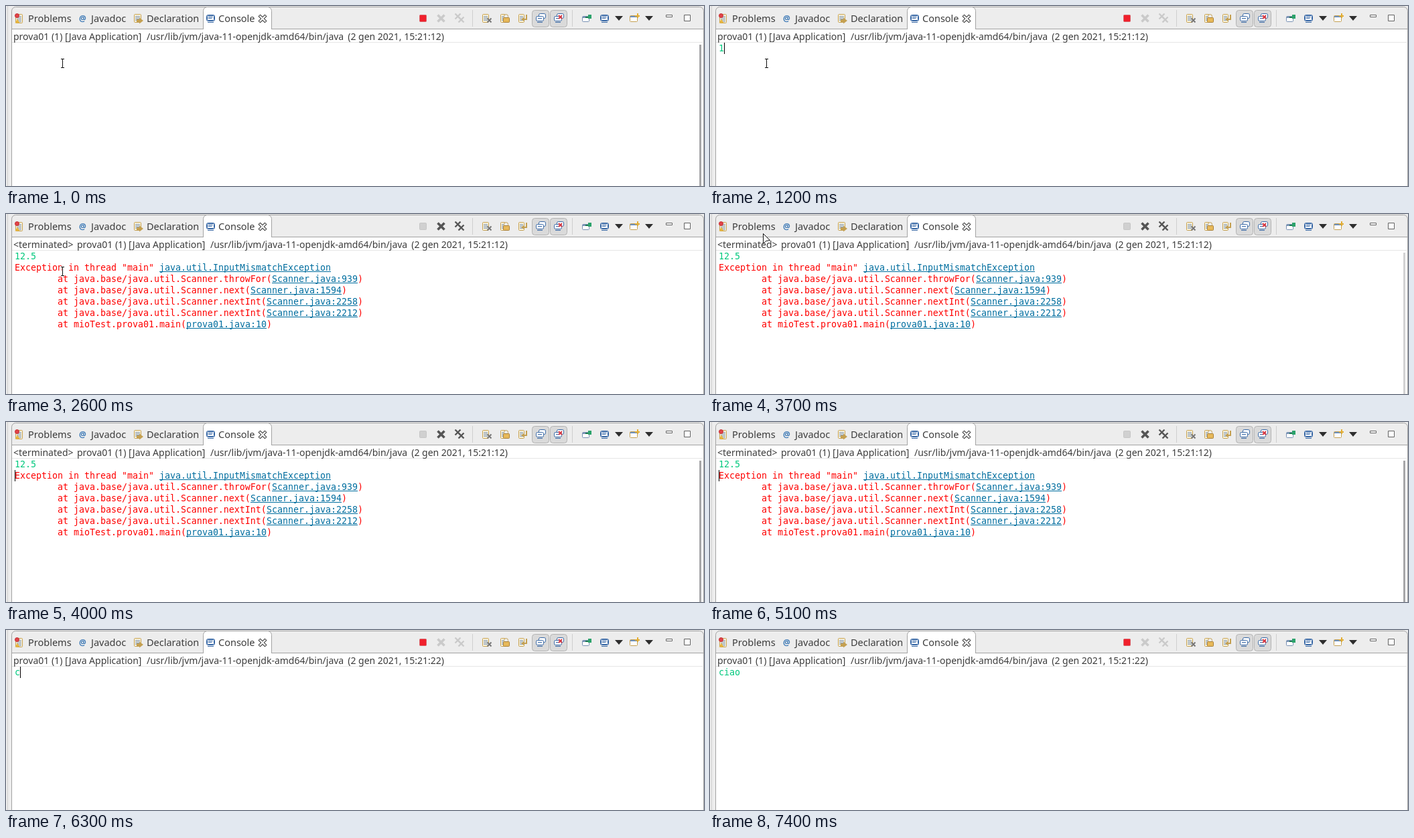
These frames come from a looping animation (1042 px wide and 270 px high, 8 s). An HTML page with a canvas:

```html
<!DOCTYPE html>
<html lang="it">
<head>
<meta charset="utf-8">
<title>Console</title>
<style>
html, body { margin: 0; width: 100%; height: 100%; overflow: hidden; background: #fff; }
canvas { display: block; }
</style>
</head>
<body>
<canvas id="stage" width="1042" height="270"></canvas>
<script>
const ctx = document.getElementById('stage').getContext('2d');
const LOOP = 8000, TICK = 100, BLINK = 600;
const END = 2600, FOCUS = 4000, RESTART = 5400, RERUN = 5600;
const UI = '"Noto Sans", "Open Sans", sans-serif';
const TITLE = '14px ' + UI, TAB = '14.5px ' + UI;
const MONO = '13.29px "DejaVu Sans Mono", monospace';
const INK = '#3c3c3c', EDGE = '#a3a3a3', BLUE = '#3465a4', GOLD = '#c4a052', CREAM = '#fff6dc';
const LEFT = 13, CHAR = 8, LINE = 17, BASE = 68;

const TRACE = [
  'Exception in thread "main" java.util.InputMismatchException',
  ...['java.base/java.util.Scanner.throwFor(Scanner.java:939)',
    'java.base/java.util.Scanner.next(Scanner.java:1594)',
    'java.base/java.util.Scanner.nextInt(Scanner.java:2258)',
    'java.base/java.util.Scanner.nextInt(Scanner.java:2212)',
    'mioTest.prova01.main(prova01.java:10)'].map(call => '        at ' + call)
];
const LINK = /java\.util\.\w+Exception|\w+\.java:\d+/;

const clamp = u => Math.min(1, Math.max(0, u));

function rect(x, y, w, h, color) {
  ctx.fillStyle = color;
  ctx.fillRect(x, y, w, h);
}

function box(x, y, w, h, radius, fill, stroke) {
  ctx.beginPath();
  ctx.roundRect(x + .5, y + .5, w - 1, h - 1, radius);
  ctx.fillStyle = fill;
  ctx.fill();
  ctx.strokeStyle = stroke;
  ctx.lineWidth = 1;
  ctx.stroke();
}

function text(str, x, y, font, color, align = 'left') {
  ctx.font = font;
  ctx.fillStyle = color;
  ctx.textAlign = align;
  ctx.fillText(str, x, y);
}

function cross(cx, cy, r, width, color) {
  ctx.beginPath();
  for (const s of [-1, 1]) {
    ctx.moveTo(cx - r, cy - r * s);
    ctx.lineTo(cx + r, cy + r * s);
  }
  ctx.strokeStyle = color;
  ctx.lineWidth = width;
  ctx.stroke();
}

// Isosceles triangle around a centre; turn is its direction in quarter turns from "up".
function triangle(cx, cy, w, h, turn, color) {
  ctx.save();
  ctx.translate(cx, cy);
  ctx.rotate(turn * Math.PI / 2);
  ctx.beginPath();
  ctx.moveTo(-w / 2, h / 2);
  ctx.lineTo(0, -h / 2);
  ctx.lineTo(w / 2, h / 2);
  ctx.fillStyle = color;
  ctx.fill();
  ctx.restore();
}

function monitor(x, y) {
  box(x, y, 13, 10, 2, '#fff', BLUE);
  box(x + 1, y + 1, 11, 8, 1, '#fff', BLUE);
  for (const dy of [3, 5]) rect(x + 3, y + dy, 8 - dy / 2, 1, BLUE);
  rect(x + 2, y + 11, 9, 1, BLUE);
}

function page(x, y, w, h) {
  box(x, y, w, h, 1, CREAM, GOLD);
  for (let dy = 3; dy < h - 2; dy += 2) rect(x + 2, y + dy, w - 4, 1, '#7f97b8');
}

function stackToggle(x) {
  box(x, 6, 26, 26, 4, '#dadada', '#b3b3b3');
  box(x + 10, 11, 11, 8, 2, '#fff', BLUE);
  box(x + 6, 15, 12, 8, 2, '#fff', BLUE);
  rect(x + 9, 18, 6, 1, BLUE);
  rect(x + 8, 24, 8, 1, BLUE);
}

function tabIcons() {
  page(14, 12, 11, 14);
  box(13, 11, 7, 7, 3, '#e0444a', '#c5282e');
  triangle(17, 22.5, 7, 6, 0, '#e8b53c');

  text('@', 109, 23, 'bold 12px ' + UI, '#3b78b5');

  page(191, 12, 11, 13);
  rect(195, 20, 5, 4, GOLD);
  triangle(202, 22, 9, 6, 1, GOLD);

  monitor(299, 13);
  cross(383, 19, 5, 4.5, '#454545');
  cross(383, 19, 4.3, 2.2, '#fff');
}

function toolbar(running) {
  const [red, rim, gray] = running
    ? ['#f0202c', '#d8646a', '#cacaca'] : ['#d0d0d0', '#c6c6c6', '#555'];
  box(617, 13, 11, 11, 1, red, rim);
  cross(649.5, 18.5, 5, 3.6, gray);
  cross(674.5, 15.5, 4, 2.4, gray);
  cross(679.5, 20.5, 4, 2.4, gray);
  for (const x of [696, 845]) rect(x, 6, 1, 25, '#cfcfcf');

  page(711, 12, 10, 13);
  cross(721.5, 21.5, 3, 2, '#777');

  page(738, 12, 8, 13);
  box(743, 12, 7, 8, 3, '#ededed', GOLD);
  box(742, 17, 10, 8, 1, '#e7b95a', '#a8803a');

  page(765, 12, 9, 13);
  rect(773, 19, 5, 2, GOLD);
  rect(776, 13, 2, 8, GOLD);
  triangle(771.5, 20, 7, 5, 3, GOLD);

  stackToggle(785);
  stackToggle(812);
  cross(827.5, 16.5, 2.5, 1.8, '#dc343b');

  box(860, 15, 11, 9, 1, '#fff', '#7891b3');
  rect(861, 16, 9, 2, '#7891b3');
  rect(865, 16, 5, 2, '#1c7b50');
  rect(869, 13, 5, 6, '#2ca36b');

  monitor(887, 13);
  box(931, 14, 12, 10, 1, '#fff', GOLD);
  rect(932, 15, 10, 2, '#6c91c1');
  rect(942, 11, 2, 7, '#e2ac32');
  rect(939, 14, 7, 2, '#e2ac32');
  for (const x of [915, 960]) triangle(x, 18.5, 12, 7, 2, '#2e2e2e');

  box(985, 13, 10, 4, 0, '#fff', '#626262');
  box(1012, 13, 10, 10, 0, '#fff', '#626262');
}

function shell(running) {
  rect(0, 0, 1042, 270, '#ededed');
  rect(2, 0, 1, 270, '#cfcfcf');
  box(8, 1, 1034, 290, [6, 6, 0, 0], '#ededed', EDGE);
  box(294, 1, 103, 34, [6, 6, 0, 0], '#fff', EDGE);
  rect(9, 34, 1032, 1, EDGE);
  rect(9, 35, 1032, 235, '#fff');
  rect(295, 34, 101, 1, '#fff');
  rect(9, 54, 1031, 1, '#e6e6e6');
  for (const [name, x] of [['Problems', 33], ['Javadoc', 127], ['Declaration', 210], ['Console', 317]])
    text(name, x, 24, TAB, INK);
  tabIcons();
  toolbar(running);
}

function title(running, clock) {
  const x = running ? 11 : 106;
  if (!running) text('<terminated>', 11, 51, TITLE, INK);
  text('prova01 (1) [Java Application]', x, 51, TITLE, INK);
  text('/usr/lib/jvm/java-11-openjdk-amd64/bin/java', x + 199, 51, TITLE, INK);
  text(`(2 gen 2021, ${clock})`, x + 643, 51, TITLE, INK, 'right');
}

function trace() {
  TRACE.forEach((line, i) => {
    const y = BASE + LINE * (i + 1);
    const { 0: link, index } = line.match(LINK);
    const x = LEFT + index * CHAR, w = link.length * CHAR;
    text(line.slice(0, index), LEFT, y, MONO, '#f00');
    text(link, x, y, MONO, '#006e9f');
    rect(x, y + 1, w, 1, '#006e9f');
    text(line.slice(index + link.length), x + w, y, MONO, '#f00');
  });
}

function beam(x, y) {
  for (const [pad, color] of [[1, 'rgba(255,255,255,.8)'], [0, '#111']]) {
    for (const dy of [0, 13]) rect(x - 2 - pad, y + dy - pad, 5 + 2 * pad, 1 + 2 * pad, color);
    rect(x - pad, y, 1 + 2 * pad, 14, color);
  }
}

function arrow(x, y) {
  ctx.beginPath();
  for (const [dx, dy] of [[0, 0], [0, 15], [4, 11], [10, 10]]) ctx.lineTo(x + dx, y + dy);
  ctx.closePath();
  ctx.fillStyle = '#fff';
  ctx.fill();
  ctx.strokeStyle = '#111';
  ctx.lineWidth = 1;
  ctx.stroke();
}

// The first word is typed ever more slowly, the second at an even pace.
const WORDS = [
  { word: '12.5', keyAt: k => 1200 + 50 * k * (k + 1) },
  { word: 'ciao', keyAt: k => 6300 + 165 * k }
];

function typing(t) {
  const { word, keyAt } = WORDS[t < RESTART ? 0 : 1];
  const count = [...word].filter((_, k) => t >= keyAt(k)).length;
  return { typed: word.slice(0, count), lastKey: count ? keyAt(count - 1) : 0 };
}

// The caret blinks evenly and starts afresh with each key or run.
function caretOn(t, running, lastKey) {
  if (!running && t < FOCUS) return false;
  const since = t - ((running && lastKey) || (t < RERUN ? 300 : RERUN));
  return since >= 0 && since % (2 * BLINK) < BLINK;
}

function barAlpha(t) {
  if (t >= RESTART) return 0;
  return (1 - clamp((t - 700) / 600)) ** 3 + clamp((t - 3600) / 200);
}

function clockAt(t) {
  return t >= RERUN ? '15:21:22' : t >= RESTART ? '15:19:50' : '15:21:12';
}

function draw(t) {
  const running = t < END || t >= RESTART;
  const { typed, lastKey } = typing(t);
  shell(running);
  title(running, clockAt(t));
  text(typed, LEFT, BASE, MONO, '#00c87d');
  if (!running) trace();

  if (caretOn(t, running, lastKey))
    rect(LEFT + (running ? typed.length * CHAR : 0), running ? 55 : 55 + LINE, 1, LINE, '#000');

  ctx.globalAlpha = barAlpha(t);
  rect(1035, 58, 3, 212, '#a6a6a8');
  ctx.globalAlpha = 1;

  if (t < 3700) beam(84, 79);
  else if (t < 3800) arrow(79.5, 29.5);
}

const start = performance.now();
function tick() {
  const t = (performance.now() - start) % LOOP;
  draw(Math.floor(t / TICK) * TICK);
  requestAnimationFrame(tick);
}
tick();
</script>
</body>
</html>
```
